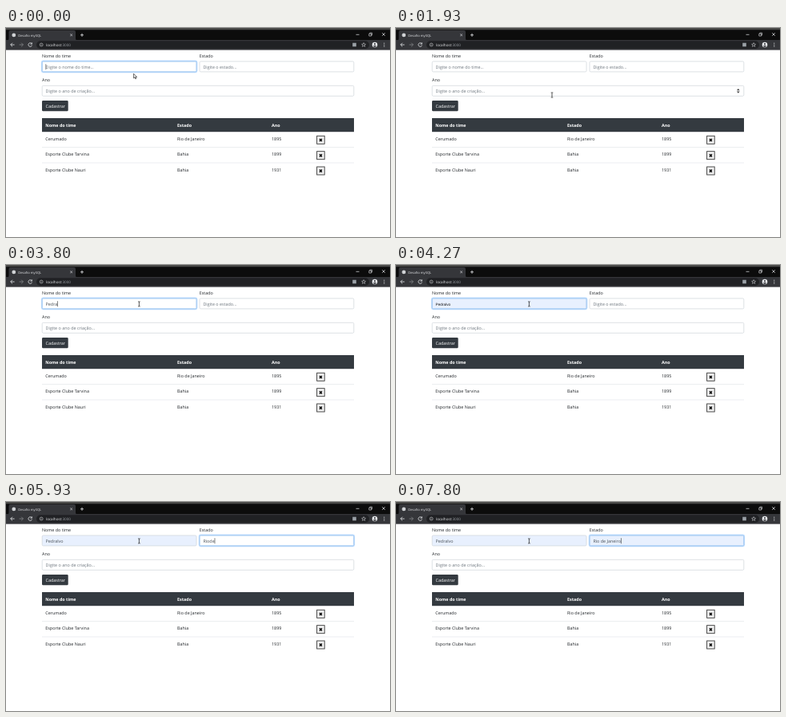
An HTML page that plays this animation: 480x262 px, repeating every 8 s.

```html
<!DOCTYPE html>
<html lang="pt">
<head>
<meta charset="utf-8">
<title>Cadastro de times</title>
<style>
html, body { margin: 0; width: 100%; height: 100%; overflow: hidden; background: #fff; }
svg { display: block; width: 100%; height: 100%; }
text { font: 5.4px "Open Sans", "Noto Sans", sans-serif; fill: #212529; text-rendering: geometricPrecision; }
.head { font-weight: 700; fill: #fff; }
.hint { fill: #6c757d; }
.value { fill: #495057; }
.preview { font: 4.7px "Liberation Sans", sans-serif; fill: #111; }
.line { fill: none; stroke: #e8eaed; stroke-width: .8; }
</style>
</head>
<body>
<svg id="stage" viewBox="0 0 480 262" preserveAspectRatio="none"></svg>
<script>
const LOOP = 8000, STEP = 1000 / 15;
const stage = document.getElementById('stage');

function add(tag, attrs = {}, parent = stage) {
  const el = document.createElementNS('http://www.w3.org/2000/svg', tag);
  set(el, attrs);
  parent.appendChild(el);
  return el;
}
function set(el, attrs) {
  for (const k in attrs) el.setAttribute(k, attrs[k]);
}
function rect(x, y, width, height, fill, more = {}) {
  return add('rect', { x, y, width, height, fill, ...more });
}
function label(x, y, str, cls = '', style = '') {
  const el = add('text', { x, y, class: cls, style });
  el.textContent = str;
  return el;
}
function line(d, style = '') {
  return add('path', { d, class: 'line', style });
}
function show(el, on) {
  el.setAttribute('visibility', on ? 'visible' : 'hidden');
}
// Last entry of a time-sorted list that has begun by t
function at(keys, t) {
  let hit = keys[0];
  for (const k of keys) if (k[0] <= t) hit = k;
  return hit;
}

function drawBrowser() {
  rect(0, 0, 480, 15.5, '#0c0c0c');
  rect(0, 0, 480, 2.3, '#4b4b49');
  add('path', { d: 'M2 15.5Q3.5 15 3.5 13V5Q3.5 3 5.5 3H85Q87 3 87 5V13Q87 15 88.5 15.5Z', fill: '#35363a' });
  rect(0, 15, 480, 12.6, '#35363a');
  rect(38, 16.2, 416, 9.8, '#202124', { rx: 4.9 });

  add('circle', { cx: 9.8, cy: 8.9, r: 2.4, fill: '#d0d2d5' });
  label(15.3, 10.5, 'Desafio mySQL', '', 'font-size:4.1px;fill:#e8eaed');
  line('M80.2 7.4l2.8 2.8m0-2.8l-2.8 2.8', 'stroke-width:.6');
  line('M93 8.8h4M95 6.8v4');
  line('M437.5 8.3h4', 'stroke-width:.7');
  line('M453.8 7.2h2.8v2.8h-2.8zM454.8 7v-.9h2.8v2.8h-.9', 'stroke-width:.6');
  line('M470.2 6.2l3.6 3.6m0-3.6l-3.6 3.6', 'stroke-width:.7');

  line('M10.6 21H5.8M8 18.7L5.7 21L8 23.3');
  line('M16.6 21h4.8M19.2 18.7L21.5 21L19.2 23.3', 'stroke:#85878a');
  line('M32.1 19.6A2.3 2.3 0 1 0 32.5 21.6M32.4 18.3v1.8h-1.9');
  add('circle', { cx: 44.2, cy: 21, r: 2, class: 'line', style: 'stroke-width:.5' });
  line('M44.2 20.7v1.3M44.2 19.7v.5', 'stroke-width:.5');
  const url = label(50, 22.7, 'localhost', '', 'font-size:4.6px;fill:#e8eaed');
  add('tspan', { fill: '#9aa0a6' }, url).textContent = ':3000';
  rect(433.2, 18.7, 4.6, 4.6, '#9aa0a6');
  line('M447.1 18.5l.7 1.7 1.8.1-1.4 1.2.5 1.8-1.6-1-1.6 1 .5-1.8-1.4-1.2 1.8-.1z', 'stroke-width:.5');
  add('circle', { cx: 461, cy: 21, r: 3.3, fill: '#e8eaed' });
  add('circle', { cx: 461, cy: 20, r: 1.1, fill: '#35363a' });
  add('path', { d: 'M458.9 22.8Q461 20.8 463.1 22.8Q461 24.8 458.9 22.8Z', fill: '#35363a' });
  for (const cy of [19.1, 21, 22.9]) add('circle', { cx: 472.8, cy, r: .55, fill: '#e8eaed' });
}

function makeField(x, y, width, hint) {
  const box = { rx: 1.4 };
  const ring = rect(x - .55, y - .55, width + 1.1, 14.5, 'none',
    { rx: 1.9, stroke: '#007bff', 'stroke-opacity': .25, 'stroke-width': 1.1 });
  const back = rect(x + .2, y + .2, width - .4, 13, '#fff', { ...box, stroke: '#ced4da', 'stroke-width': .7 });
  const glow = rect(x + .2, y + .2, width - .4, 13, 'none', { ...box, stroke: '#80bdff', 'stroke-width': .7 });
  const text = label(x + 4.6, y + 9, hint, 'hint');
  const caret = rect(0, y + 3.5, .6, 7, '#333');
  return {
    update(state, focus, caretOn) {
      const [, str, mode] = state;
      set(ring, { opacity: focus });
      set(glow, { opacity: focus });
      set(back, { fill: mode ? '#e8f0fe' : '#fff' });
      text.textContent = (str || hint).replace(/ /g, '\u00a0');
      text.setAttribute('class', !str ? 'hint' : mode === 'preview' ? 'preview' : 'value');
      const end = str ? text.getComputedTextLength() : 0;
      set(caret, { x: x + 4.6 + end });
      show(caret, caretOn && mode !== 'preview');
    }
  };
}

function drawTable() {
  const cols = [49.3, 214, 332];
  rect(45, 113, 390, 17.2, '#343a40');
  ['Nome do time', 'Estado', 'Ano'].forEach((s, i) => label(cols[i], 123.6, s, 'head'));
  const rows = [
    ['Cerumado', 'Rio de Janeiro', '1895'],
    ['Esporte Clube Tarvina', 'Bahia', '1899'],
    ['Esporte Clube Nauri', 'Bahia', '1931']
  ];
  rows.forEach((row, r) => {
    const y = 130.2 + r * 19.35;
    if (r) rect(45, y - .2, 390, .6, '#dee2e6');
    row.forEach((s, i) => label(cols[i], y + 10.9, s));
    rect(388.6, y + 5.1, 9.6, 10, '#efefef', { stroke: '#3a3a3a', 'stroke-width': .9 });
    line(`M391.9 ${y + 8.7}l3 3.2m0-3.2l-3 3.2`, 'stroke:#000;stroke-width:1.4');
  });
}

drawBrowser();
label(45, 36.8, 'Nome do time');
label(241.8, 36.8, 'Estado');
label(45, 67.2, 'Ano');
const team = makeField(45, 41.7, 193.3, 'Digite o nome do time...');
const region = makeField(241.8, 41.7, 193.2, 'Digite o estado...');
const year = makeField(45, 72.1, 390, 'Digite o ano de criação...');
const spinner = add('path', { d: 'M425.9 78.2l1.9-2.2 1.9 2.2zM425.9 79.6l1.9 2.2 1.9-2.2z', fill: '#444' });
rect(45, 91, 32.7, 13.3, '#343a40', { rx: 1.4 });
label(49.6, 99.8, 'Cadastrar', '', 'fill:#fff');
drawTable();

const arrow = add('path', {
  d: 'M0 0V5.6L1.3 4.4L2.2 6.5L3.1 6.1L2.2 4.1H4Z',
  fill: '#fff', stroke: '#000', 'stroke-width': .6
});
const beam = add('path', {
  d: 'M-1.3-3H-.4L0-2.7L.4-3H1.3M0-2.7V2.7M-1.3 3H-.4L0 2.7L.4 3H1.3',
  fill: 'none', stroke: '#111', 'stroke-width': .7
});

// time, x, y, text cursor
const pointer = [
  [0, 159.6, 57.3], [70, 339, 174.3],
  [1270, 330, 180], [1330, 272, 197], [1400, 192, 201], [1470, 120, 200],
  [1530, 72, 196], [1600, 45.4, 192.6], [1670, 43.7, 190], [1730, 62, 172],
  [1800, 112, 134], [1870, 168, 106], [1930, 195, 84, 1],
  [2070, 178, 68], [2130, 166.6, 58.5], [2330, 166.4, 52, 1], [2400, 166.4, 48.9, 1]
];
// time, text, fill mode
const teamText = [
  [0, ''], [3200, 'P'], [3330, 'Pe'], [3470, 'Ped'], [3600, 'Pedr'], [3800, 'Pedra'],
  [4270, 'Pedralvo', 'preview'], [4470, 'Pedralvo', 'filled']
];
const regionText = [
  [0, ''], [5330, 'R'], [5600, 'Ri'], [5800, 'Rio'], [5930, 'Riode'],
  [6400, 'Riod'], [6470, 'Rio'], [6530, 'Rio '], [6670, 'Rio d'], [6730, 'Rio de'],
  [6870, 'Rio de '], [6930, 'Rio de J'],
  [7470, 'Rio de Janeiro', 'preview'], [7800, 'Rio de Janeiro', 'filled']
];
// time, caret on
const teamCaret = [[0, 1], [200, 0], [730, 1], [1270, 0], [2460, 1], [3000, 0], [3200, 1], [4730, 0]];
const regionCaret = [[0, 0], [4800, 1]];

// Focus ring fades over three ticks
function fade(t, start) {
  const tick = Math.floor((t + 4) / STEP) - Math.floor((start + 4) / STEP) + 1;
  return Math.max(0, Math.min(1, tick / 3));
}

function render(t) {
  team.update(at(teamText, t), 1 - fade(t, 1670) + fade(t, 2470) - fade(t, 4730), at(teamCaret, t)[1]);
  region.update(at(regionText, t), fade(t, 4730), at(regionCaret, t)[1]);
  year.update([0, ''], 0, false);
  show(spinner, t >= 1930 && t < 2070);
  const [, x, y, isBeam] = at(pointer, t);
  for (const el of [arrow, beam]) set(el, { transform: `translate(${x} ${y})` });
  show(arrow, !isBeam);
  show(beam, isBeam);
}

const began = performance.now();
function loop() {
  render((performance.now() - began) % LOOP);
  requestAnimationFrame(loop);
}
loop();
</script>
</body>
</html>
```
